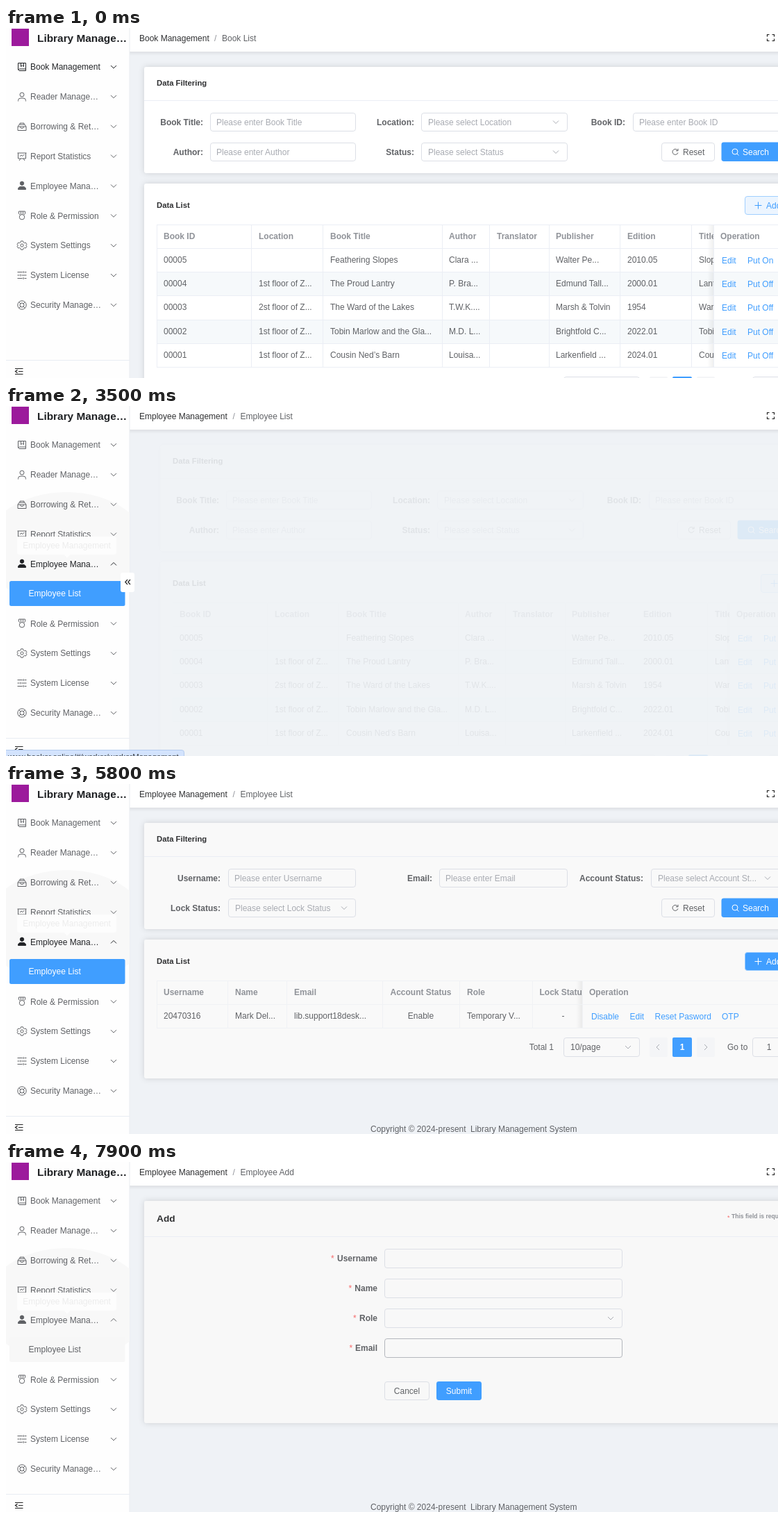
An HTML page for the animation above (8 s loop, 1112x504 px).

```html
<!DOCTYPE html>
<html lang="en">
<head>
<meta charset="utf-8">
<title>Library admin</title>
<style>
html, body { margin: 0; width: 100%; height: 100%; overflow: hidden; background: #fff; }
svg { display: block; font: 12px "Liberation Sans", Arial, sans-serif; }
text { fill: currentColor; }
.b { font-weight: 700; }
.i { fill: none; stroke: currentColor; }
</style>
</head>
<body>
<svg id="stage" width="1112" height="504" viewBox="0 0 1112 504"></svg>
<script>
const LOOP = 8000, BLUE = '#409eff', PALE = '#ecf5ff', DARK = '#222427', GREY = '#606266', HEAD = '#909399', HINT = '#a8abb2';

// ---- drawing helpers; text is placed by its middle, on whole pixels ----
const text = (x, y, s, color = GREY, more = '') => `<text x="${x}" y="${Math.round(y + 4.3)}" color="${color}" ${more}>${s}</text>`;
const bold = (x, y, s, color = GREY, more = '') => text(x, y, s, color, `class="b" ${more}`);
const END = 'text-anchor="end"', MID = 'text-anchor="middle"';
const rect = (x, y, x2, y2, fill, more = '') => `<rect x="${x}" y="${y}" width="${x2 - x}" height="${y2 - y}" fill="${fill}" ${more}/>`;
const box = (x, y, x2, y2, fill = 'none', stroke = '#dcdfe6', more = '') =>
  rect(x + .5, y + .5, x2 - .5, y2 - .5, fill, `stroke="${stroke}" rx="3.4" ${more}`);
const line = (x, y, x2, y2, c = '#ebeef5') => `<path d="M${x} ${y}L${x2} ${y2}" stroke="${c}"/>`;
const path = (d, color = GREY, more = '') => `<path class="i" d="${d}" color="${color}" ${more}/>`;
const chevron = (x, y, color = GREY, dir = 1) => path(`M${x - 4} ${y - 2 * dir}l4 ${4 * dir}l4 ${-4 * dir}`, color);
const group = (id, body, more = '') => `<g id="${id}" ${more}>${body}</g>`;

const card = (y, y2, fill) => rect(199, y, 1140, y2, fill, 'rx="3.4" filter="url(#soft)"');

function field(label, end, x, x2, y, hint, select) {
  return bold(end, y, label, GREY, END) + box(x, y - 13.5, x2, y + 13.5) +
    text(x + (select ? 10 : 9), y, hint, HINT) + (select ? chevron(select, y, HINT) : '');
}

function searchButtons() {
  return box(944, 165, 1021, 192) + path('M967.6 176.5a4 4 0 1 0 .3 3M968 173.8v3h-3') + text(975, 178.5, 'Reset') +
    rect(1030.5, 164.5, 1140, 192, BLUE, 'rx="3.4"') +
    path('M1054 178a4 4 0 1 0-8 0a4 4 0 0 0 8 0M1053 181l2.5 2.5', '#fff') + text(1061, 178.5, 'Search', '#fff');
}

function addButton(id) {
  return box(1064, 242, 1140, 269, PALE, '#a0cfff', `id="${id}Box"`) +
    group(id + 'Text', path('M1078.5 255.5h10M1083.5 250.5v10', 'inherit') + text(1095, 255.5, 'Add', 'inherit'), `color="${BLUE}"`);
}

// cols: [x, label, text x, anchor]; ops: one list of [x, label] per row
function table(cols, rows, opX, ops, bg, stroke) {
  const top = 283, h = 34.25;
  const edge = i => Math.floor(top + h * i) + .5;
  const bottom = edge(rows.length + 1);
  const stripe = i => i % 2 ? '#f6f9fb' : bg;
  let s = '', right = '';
  cols.forEach(([, label, x, a]) => s += bold(x, 299.5, label, HEAD, a));
  rows.forEach((row, i) => {
    const y = edge(i + 1), y2 = edge(i + 2), mid = y + 16.3;
    s += rect(217, y, opX, y2, stripe(i));
    row.forEach((cell, k) => s += text(cols[k][2], mid, cell, GREY, cols[k][3]));
    right += rect(opX, y, 1140, y2, stripe(i));
    ops[i].forEach(([x, label]) => right += text(x, mid + 1, label, BLUE));
  });
  cols.forEach(([x]) => s += line(x + .5, top, x + .5, bottom, stroke));
  s += rect(opX - 9, top, opX, bottom, 'url(#edge)') + rect(opX, top, 1140, edge(1), bg) +
    bold(opX + 10, 299.5, 'Operation', HEAD) + right;
  for (let i = 0; i <= rows.length + 1; i++) s += line(217, edge(i), 1112, edge(i), stroke);
  return s + line(opX + .5, top, opX + .5, bottom, stroke);
}

function pager(y, total) {
  return text(789, y, 'Total ' + total, GREY, END) + box(803, y - 14, 913, y + 14) + text(813, y, '10/page') +
    chevron(896, y, HINT) + rect(927, y - 14, 953, y + 14, '#f4f5f7', 'rx="2"') + path(`M941 ${y - 4}l-4 4l4 4`, HINT) +
    rect(960, y - 14, 988, y + 14, BLUE, 'rx="2"') + bold(974, y, 1, '#fff', MID) +
    rect(995, y - 14, 1021, y + 14, '#f4f5f7', 'rx="2"') + path(`M1006 ${y - 4}l4 4l-4 4`, HINT) +
    text(1039, y - .6, 'Go to') + box(1075, y - 14, 1130, y + 14) + text(1099, y, 1, GREY, MID);
}

const frame = fill => card(56, 209, fill) + line(199, 104.5, 1112, 104.5) +
  bold(217, 79, 'Data Filtering', '#303133', 'font-size="11.3"');
const listTitle = bold(217, 255, 'Data List', '#303133', 'font-size="11.3"');

// ---- pages ----
function bookPage() {
  const cols = [[217, 'Book ID', 227], [353, 'Location', 364], [456, 'Book Title', 467], [628, 'Author', 638],
    [696, 'Translator', 707], [782, 'Publisher', 792], [884, 'Edition', 895], [987, 'Title No.', 998]];
  const rows = [
    ['00005', '', 'Feathering Slopes', 'Clara ...', '', 'Walter Pe...', '2010.05', 'Slopes'],
    ['00004', '1st floor of Z...', 'The Proud Lantry', 'P. Bra...', '', 'Edmund Tall...', '2000.01', 'Lantry'],
    ['00003', '2st floor of Z...', 'The Ward of the Lakes', 'T.W.K....', '', 'Marsh &amp; Tolvin', '1954', 'Ward'],
    ['00002', '1st floor of Z...', 'Tobin Marlow and the Gla...', 'M.D. L...', '', 'Brightfold C...', '2022.01', 'Tobin'],
    ['00001', '1st floor of Z...', 'Cousin Ned’s Barn', 'Louisa...', '', 'Larkenfield ...', '2024.01', 'Cousin']];
  const ops = rows.map((r, i) => [[1031, 'Edit'], [1068, i ? 'Put Off' : 'Put On']]);
  return frame('#fff') +
    field('Book Title:', 284, 294, 504, 135.5, 'Please enter Book Title') +
    field('Location:', 588, 598, 809, 135.5, 'Please select Location', 792) +
    field('Book ID:', 892, 903, 1140, 135.5, 'Please enter Book ID') +
    field('Author:', 284, 294, 504, 178.5, 'Please enter Author') +
    field('Status:', 588, 598, 809, 178.5, 'Please select Status', 792) + searchButtons() +
    card(224, 560, '#fff') + listTitle + addButton('bookAdd') +
    table(cols, rows, 1019, ops, '#fff', '#ebeef5') + pager(516, 5);
}

function staffPage() {
  const bg = '#f9f9f9';
  const cols = [[217, 'Username', 227], [319, 'Name', 330], [404, 'Email', 415], [542, 'Account Status', 597.5, MID],
    [653, 'Role', 664], [758, 'Lock Status', 802.5, MID]];
  const ops = [[[843, 'Disable'], [898.5, 'Edit'], [934.5, 'Reset Pasword'], [1031, 'OTP']]];
  return frame(bg) +
    field('Username:', 309, 320, 504, 135.5, 'Please enter Username') +
    field('Email:', 614, 624, 809, 135.5, 'Please enter Email') +
    field('Account Status:', 918, 929, 1140, 135.5, 'Please select Account St...', 1097) +
    field('Lock Status:', 309, 320, 504, 178.5, 'Please select Lock Status', 487) + searchButtons() +
    card(224, 424, bg) + listTitle + addButton('staffAdd') +
    table(cols, [['20470316', 'Mark Del...', 'lib.support18desk...', 'Enable', 'Temporary V...', '-']], 830, ops, bg, '#f0f2f5') +
    pager(379, 1);
}

function formPage() {
  const input = (label, y, star, stroke) => bold(535, y, label, GREY, END) +
    text(star, y, '*', '#f56c6c') + box(545, y - 14, 888, y + 14, 'none', stroke);
  return card(56, 376, '#f8f8f8') + line(199, 107.5, 1112, 107.5) +
    bold(217, 81.5, 'Add', '#303133', 'font-size="13.7"') +
    text(1039, 78.5, '*', '#f56c6c', 'font-size="9"') +
    bold(1045, 77, 'This field is required', HEAD, 'font-size="8.57"') +
    input('Username', 139, 468) + input('Name', 182, 493.5) + input('Role', 225, 500) + input('Email', 268, 494.5, '#b4b7bd') +
    chevron(871, 225, HINT) + box(545, 316, 610, 343) + text(577.5, 329.5, 'Cancel', GREY, MID) +
    rect(620, 316, 685, 343, BLUE, 'rx="3.4"') + text(652.5, 329.5, 'Submit', '#fff', MID);
}

// ---- sidebar ----
const menu = [
  ['Book Management', 'M1.5 11.5v-10h11v11h-9.5a1.5 1.5 0 0 1 0-2.5h9.5M5.5 1.5v5l2-1.5l2 1.5v-5'],
  ['Reader Manage…', 'M7 1a3 3 0 1 0 0 6a3 3 0 0 0 0-6M1.5 13.5v-1A3.5 3.5 0 0 1 5 9h4a3.5 3.5 0 0 1 3.5 3.5v1'],
  ['Borrowing &amp; Ret…', 'M1 7h12v5.5H1zM1 7l2-3h8l2 3M4 4V2h6v2M4.5 7a2.5 2.5 0 0 0 5 0'],
  ['Report Statistics', 'M.5 2h13M1.5 2v8h11V2M5 10l-2 3M9 10l2 3M4 7l2-2l2 1.5L10.5 4'],
  ['Employee Mana…', 'M7 1a2.7 2.7 0 1 0 0 5.4a2.7 2.7 0 0 0 0-5.4M1.5 12.5a3.5 3.5 0 0 1 3.5-4h4a3.5 3.5 0 0 1 3.5 4z'],
  ['Role &amp; Permission', 'M2.5 1h9v3.5l-2 1.5M2.5 1v3.5l2 1.5M5.5 1v4M8.5 1v4M7 5.5a3.7 3.7 0 1 0 0 7.4a3.7 3.7 0 0 0 0-7.4'],
  ['System Settings', 'M5.5.8h3l.5 1.8l1.6.9l1.8-.5l1.5 2.6L12.6 7l1.3 1.4l-1.5 2.6l-1.8-.5l-1.6.9l-.5 1.8h-3l-.5-1.8l-1.6-.9l-1.8.5L.1 8.4L1.4 7L.1 5.6l1.5-2.6l1.8.5L5 2.6zM7 4.9a2.1 2.1 0 1 0 0 4.2a2.1 2.1 0 0 0 0-4.2'],
  ['System License', 'M.5 2.5h7M10.5 2.5h3M9 1v3M.5 7h3M6.5 7h7M5 5.5v3M.5 11.5h7M10.5 11.5h3M9 10v3'],
  ['Security Manage…', 'M7 .8a6.2 6.2 0 1 0 0 12.4A6.2 6.2 0 0 0 7 .8M7 4a3 3 0 1 0 0 6a3 3 0 0 0 0-6M2.6 2.6l2.3 2.3M9.1 9.1l2.3 2.3M11.4 2.6L9.1 4.9M4.9 9.1l-2.3 2.3']];

function item([label, icon], i) {
  const y = 56 + i * 42.86, staff = i === 4;
  const mark = `<path d="${icon}" class="i" transform="translate(16 ${Math.round(y - 7)})" ${staff ? 'style="fill:currentColor"' : ''}/>`;
  const arrow = staff ? group('down', chevron(155, y, 'inherit')) + group('up', chevron(155, y, 'inherit', -1)) : chevron(155, y, 'inherit');
  return group('icon' + i, mark + arrow, `color="${GREY}"`) + group('label' + i, text(35, y, label, 'inherit'), `color="${GREY}"`);
}

const tip = (ink, fill, more) => rect(16, 188, 159, 214, fill, `rx="3.4" ${more}`) +
  `<path d="M83 213.5h10l-5 5z" fill="${fill}"/>` + text(87.5, 201, 'Employee Management', ink, MID);

function sidebar() {
  return rect(0, 0, 178, 504, '#fefefe') + line(178, 0, 178, 504, '#e9ecf0') +
    group('halo', '<ellipse cx="87" cy="206" rx="118" ry="82" fill="#f8f8f8"/>', 'clip-path="url(#side)"') +
    rect(8, 1, 33, 26, '#9c1a9c') + bold(45, 15.5, 'Library Manage…', '#1f2124', 'font-size="15.4"') +
    menu.slice(0, 5).map(item).join('') +
    group('lower', menu.slice(5).map((m, i) => item(m, i + 5)).join('')) +
    group('sub', rect(5, 252, 171.5, 288, BLUE, 'id="subBox" rx="2.5"') +
      group('subText', text(32.5, 270, 'Employee List', 'inherit'), `color="${GREY}"`)) +
    group('ghost', tip('#ececec', '#fdfdfd', '')) +
    group('tip', tip('#303133', '#fff', 'filter="url(#soft)"')) +
    line(0, 478.5, 178, 478.5, '#e8edf3') +
    path('M13 490.5h11.5M18 494.5h6.5M13 498.5h11.5M16.5 492.3l-3 2.2l3 2.2', '#222', 'stroke-width="1.2"');
}

const crumb = (a, x, b) => text(192, 15, a, '#303133') + text(x, 15, '/', HEAD) + text(x + 11, 15, b);

document.getElementById('stage').innerHTML = `<defs>
  <filter id="soft" x="-10%" y="-40%" width="120%" height="180%"><feDropShadow dx="0" dy="0" stdDeviation="4" flood-color="#000" flood-opacity=".14"/></filter>
  <linearGradient id="edge"><stop offset="0" stop-color="#000" stop-opacity="0"/><stop offset="1" stop-color="#000" stop-opacity=".06"/></linearGradient>
  <linearGradient id="drop" x2="0" y2="1"><stop offset="0" stop-color="#000" stop-opacity=".07"/><stop offset="1" stop-color="#000" stop-opacity="0"/></linearGradient>
  <clipPath id="main"><rect x="178" y="34" width="934" height="470"/></clipPath>
  <clipPath id="side"><rect width="178" height="504"/></clipPath></defs>` +
  rect(178, 0, 1112, 504, '#eff2f6') +
  `<g clip-path="url(#main)">` +
  group('foot', text(525, 497, 'Copyright © 2024-present') + text(669, 497, 'Library Management System')) +
  group('books', bookPage()) + group('staff', staffPage()) + group('form', formPage()) + '</g>' +
  rect(178, 0, 1112, 34, '#fff') + rect(178, 34, 1112, 40, 'url(#drop)') +
  group('crumb1', crumb('Book Management', 300, 'Book List')) +
  group('crumb2', crumb('Employee Management', 326.5, 'Employee List') + group('slash', text(421, 15, '/', HEAD))) +
  group('crumb3', crumb('Employee Management', 326.5, 'Employee Add')) +
  path('M1096.5 12.5v-3h3M1103.5 9.5h3v3M1106.5 15.5v3h-3M1099.5 18.5h-3v-3', '#222', 'stroke-width="1.2"') +
  sidebar() +
  group('foldBox', rect(165, 240, 185, 268, '#fff', 'rx="3"')) +
  group('fold', path('M175 250l-3.2 3.5l3.2 3.5M179 250l-3.2 3.5l3.2 3.5', '#222', 'stroke-width="1.2"')) +
  group('url', box(-6, 495, 257, 520, '#d3e3fd', '#b4cbee') +
    text(3, 504.4, 'www.booker.online/#/worker/workerManagement', '#3c4043', 'font-size="11.4"'));

// ---- timeline: [ms, value, easing]; a value holds until the next unless eased ----
const anims = [];
function play(id, prop, steps) {
  const keys = steps.map(([t, v, e]) => ({ offset: t / LOOP, easing: e || 'steps(1)', [prop]: v }));
  keys.push({ ...keys[keys.length - 1], offset: 1 });
  const a = document.getElementById(id).animate(keys, { duration: LOOP, fill: 'both' });
  a.pause();
  anims.push(a);
}
const fade = (id, ...steps) => play(id, 'opacity', steps);
const tint = (id, ...steps) => play(id, 'color', steps);
const slide = (id, ...steps) => play(id, 'transform', steps.map(([t, x, e]) => [t, `translateX(${x}px)`, e]));

// Pages leave to the right and enter from the left.
const SHIFT = 25.7;
fade('books', [0, 1], [3190, 1, 'ease'], [3690, 0]);
slide('books', [0, 0], [3190, 0, 'ease'], [3690, SHIFT]);
fade('staff', [0, 0], [3880, 0, 'ease'], [4380, 1], [7200, 0]);
slide('staff', [0, -SHIFT], [3880, -SHIFT, 'ease'], [4380, 0]);
fade('form', [0, 0], [7400, 0, 'ease'], [7900, 1]);
slide('form', [0, -SHIFT], [7400, -SHIFT, 'ease'], [7900, 0]);
fade('foot', [0, 0], [3900, 1]);

fade('crumb1', [0, 1], [3200, .5], [3300, 0]);
fade('crumb2', [0, 0], [3300, .6], [3400, 1], [7500, 0]);
fade('slash', [0, 0], [6900, 1]);
fade('crumb3', [0, 0], [7500, .6], [7600, 1]);

for (const part of ['icon', 'label']) {
  tint(part + 0, [0, DARK], [3300, GREY]);
  tint(part + 4, [0, GREY], [2100, DARK], [2600, '#45474a'], [2900, GREY], [3200, DARK], [7500, GREY]);
}
tint('label6', [0, GREY], [1100, '#111'], [2100, GREY]);
tint('icon6', [0, GREY], [1400, '#111'], [2100, GREY]);
fade('down', [0, 1], [2100, 0]);
fade('up', [0, 0], [2100, 1]);
play('lower', 'transform', [[0, 'translateY(0px)'], [2100, 'translateY(42px)'], [2300, 'translateY(43px)']]);
fade('sub', [0, 0], [2100, .7], [2300, 1]);
tint('subText', [0, GREY], [2600, '#303133'], [2900, '#111'], [3200, '#fff'], [6900, '#222427'], [7500, GREY]);
play('subBox', 'fill', [[0, 'transparent'], [3200, BLUE], [6900, '#f7f7f7']]);

fade('halo', [0, 0], [2000, 1]);
fade('tip', [0, 0], [2000, 1], [2100, 0]);
fade('ghost', [0, 0], [2100, 1]);
fade('fold', [0, 0], [900, 1], [5000, .6], [5100, .2], [5200, 0]);
fade('foldBox', [0, 0], [2000, 1], [5000, .6], [5100, .2], [5200, 0]);
fade('url', [0, 0], [2600, 1], [5000, .6], [5100, .2], [5200, 0]);

play('staffAddBox', 'fill', [[0, PALE], [5800, BLUE], [6200, '#337ecc'], [6300, BLUE], [6400, '#93c8fe'], [6500, PALE]]);
tint('staffAddText', [0, BLUE], [5800, '#fff'], [6500, BLUE]);

// The screen refreshes ten times a second and rests between the two page transitions.
function tick(now) {
  let t = Math.floor(now % LOOP / 100) * 100;
  if (t > 3600 && t < 3900) t = 3600;
  anims.forEach(a => a.currentTime = t + 1);
  requestAnimationFrame(() => tick(performance.now() - start));
}
const start = performance.now();
tick(0);
</script>
</body>
</html>
```
